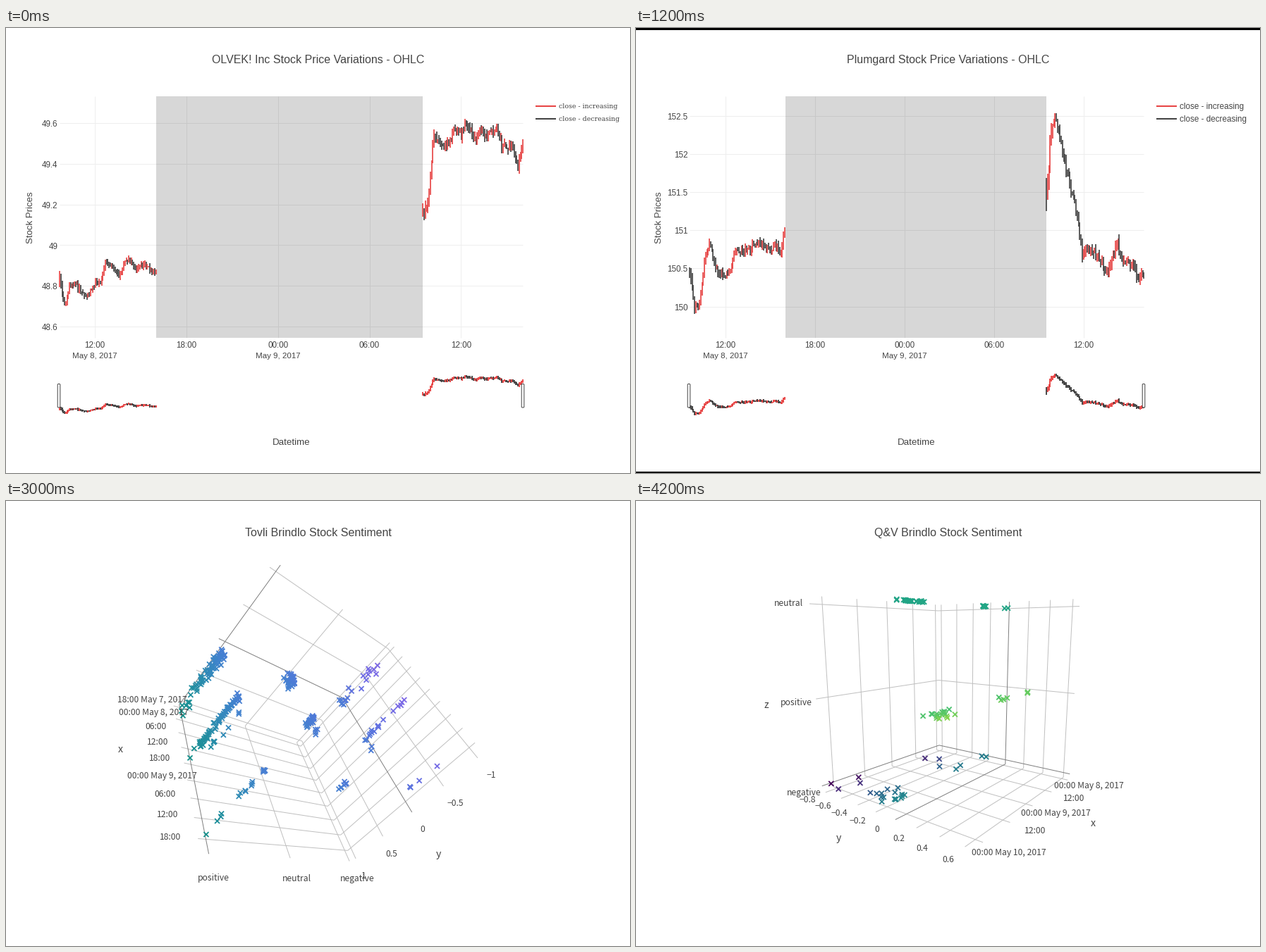
These frames come from a looping animation (885x632 px, 4800 ms). A matplotlib script:

```python
import numpy as np
import matplotlib.pyplot as plt
from matplotlib.animation import FuncAnimation
from matplotlib.collections import LineCollection
from matplotlib.colors import LinearSegmentedColormap
from matplotlib.patches import FancyBboxPatch, Rectangle

W, H, DPI = 885, 632, 100
PT = 72 / DPI  # points per pixel
SANS, SERIF, HUMAN = "Liberation Sans", "DejaVu Serif", "Noto Sans CJK JP"
INK, RED, DARK = "#444444", "#e63a3a", "#383838"
MINUS = "\u2212"

fig = plt.figure(figsize=(W / DPI, H / DPI), dpi=DPI, facecolor="white")


# ---------- helpers, all in pixels with y down ----------
def new_scene():
    ax = fig.add_axes([0, 0, 1, 1], label=f"scene{len(fig.axes)}")
    ax.set_xlim(0, W)
    ax.set_ylim(H, 0)
    ax.axis("off")
    return ax


def text(ax, x, y, s, size, font=SANS, ha="center"):
    ax.text(x, y + 0.36 * size, s, fontsize=size * PT, family=font,
            color=INK, ha=ha, va="baseline", zorder=6)


def lines(ax, segs, color, width=1.0, z=1):
    segs = np.reshape(segs, (-1, 2, 2))
    ax.add_collection(LineCollection(segs, colors=color, linewidths=width * PT,
                                     zorder=z), autolim=False)


def box(ax, x0, y0, x1, y1, **style):
    ax.add_patch(Rectangle((x0, y0), x1 - x0, y1 - y0, zorder=2, lw=0, **style))


# ---------- price charts ----------
TOP, BOTTOM, LEFT = 97, 440, 76
HIGH, LOW = 114, 423  # extremes reached by the bars


def bars(rng, x0, x1, knots, vol):
    """Low/high bars around evenly spaced knots, wilder just after opening."""
    x = np.arange(x0, x1 + 0.5, 1.75)
    n = len(x)
    close = np.interp(x, np.linspace(x0, x1, len(knots)), knots) + rng.normal(0, vol * 0.4, n)
    start = np.r_[knots[0], close[:-1]]
    reach = vol * (1 + 2 * np.exp(-np.arange(n) / 2))
    top = np.minimum(start, close) - rng.uniform(0.1, 1, n) * reach
    low = np.maximum(start, close) + rng.uniform(0.1, 1, n) * reach
    color = np.where(close < start, RED, DARK)
    return x, np.clip(top, HIGH, LOW), np.clip(low, HIGH, LOW), color


def mini(y):
    return 553 + (y - LOW) * 0.202


def price_chart(name, days, vols, ticks, label_x, noon=127, hour=21.17, right=720,
                legend=(738, SANS, 11.6), framed=False, seed=1):
    """ticks holds first value, step, y of the first, spacing and count."""
    ax = new_scene()
    rng = np.random.default_rng(seed)
    close_x, open_x = noon + 4 * hour, noon + 21.5 * hour
    text(ax, 442.5, 44.5, f"{name} Stock Price Variations - OHLC", 16)

    first, step, y0, gap, count = ticks
    for k in range(count):
        y = y0 - gap * k
        lines(ax, [LEFT, y, right, y], "#eeeeee")
        text(ax, 73.5, y + 1, f"{first + step * k:.5g}", 11.6, ha="right")
    for k in range(5):
        x = noon + 6 * hour * k
        lines(ax, [x, TOP, x, BOTTOM], "#eeeeee")
        text(ax, x, 449.5, f"{(12 + 6 * k) % 24:02d}:00", 11.6)
        if k in (0, 2):
            text(ax, x, 464.5, f"May {8 + k // 2}, 2017", 11.5)
    box(ax, close_x, TOP, open_x, BOTTOM, fc="black", alpha=0.155)

    spans = ((LEFT, close_x), (open_x, right))
    parts = [bars(rng, *s, d, v) for s, d, v in zip(spans, days, vols)]
    x, hi, lo, color = map(np.concatenate, zip(*parts))
    lines(ax, np.c_[x, hi, x, lo], color, 1.6, 3)
    lines(ax, np.c_[x, mini(hi) - 0.6, x, mini(lo) + 0.6], color, 1.8, 3)

    for hx in (75, right):
        ax.add_patch(FancyBboxPatch((hx - 1.8, 505.5), 3.6, 33.5,
                                    boxstyle="round,pad=0,rounding_size=1.2",
                                    fc="white", ec=INK, lw=PT, zorder=5))
    lx, font, size = legend
    for y, c, s in ((111, RED, "increasing"), (129, DARK, "decreasing")):
        lines(ax, [lx, y, lx + 28.5, y], c, 1.9)
        text(ax, lx + 33, y, f"close - {s}", size, font, "left")

    ax.text(label_x, 269, "Stock Prices", rotation=90, fontsize=13.3 * PT, family=SANS,
            color=INK, ha="center", va="center")
    text(ax, (LEFT + right) / 2, 587, "Datetime", 13.4)
    if framed:
        box(ax, 0, 0, W, 2.5, fc="black")
        box(ax, 0, 630, W, H, fc="black")
    return ax


# ---------- sentiment plots ----------
# Box corners seen from the back corner outwards, then the middles of its three edges.
# Axes: 0 time, 1 score, 2 mood.
KEYS = np.array([(0, 0, 0), (1, 0, 0), (0, 1, 0), (0, 0, 1), (1, 1, 0), (1, 0, 1), (0, 1, 1),
                 (.5, 0, 0), (0, .5, 0), (0, 0, .5)], float)
AXES = np.eye(3)


def camera(pixels):
    """Fit a perspective view that sends KEYS to the given pixels."""
    px = np.reshape(pixels, (-1, 2)).astype(float)
    k = KEYS[:len(px)]
    one = np.c_[k, np.ones(len(k))]
    zero = np.zeros_like(one)
    m = np.r_[np.c_[one, zero, -k * px[:, :1]], np.c_[zero, one, -k * px[:, 1:]]]
    fit = np.linalg.lstsq(m, px.T.ravel(), rcond=None)[0]
    flat, depth = fit[:8].reshape(2, 4), fit[8:]

    def project(p):
        p = np.asarray(p)
        return (p @ flat[:, :3].T + flat[:, 3]) / (p @ depth + 1)[..., None]
    return project


def time_names(start, step, n):
    """Clock labels from an hour counted since May 7; dated at midnight and first."""
    names = []
    for k in range(n):
        day, hour = divmod(start + step * k, 24)
        date = f" May {7 + day}, 2017" if k == 0 or hour == 0 else ""
        names.append(f"{hour:02d}:00{date}")
    return names


def score_names(first, last, n):
    return [f"{round(v, 1) + 0.0:g}".replace("-", MINUS) for v in np.linspace(first, last, n)]


def tweets(rng, moments, groups):
    """Points for each moment (time, spread, share) and group (mood, near, far, count)."""
    out = []
    for time, spread, share in moments:
        for mood, near, far, count in groups:
            n = max(1, round(count * share))
            score = near + (far - near) * rng.uniform(0, 1, n) ** 1.5
            out.append(np.c_[rng.normal(time, spread, n), score, np.full(n, mood)])
    return np.concatenate(out)


def slots(ax, rng, spots, colors):
    """Thin box markers, now and then with an edge missing."""
    for (x, y), c in zip(spots, colors):
        l, r, t, b = x - 2.5, x + 2.5, y - 4.7, y + 4.7
        edges = np.array([(l, t, r, t), (l, b, r, b), (l, t, l, b), (r, t, r, b)])
        lines(ax, edges[rng.random(4) < 0.93], [c], 1, 4)


def sentiment(name, pixels, times, scores, moods, zero_mood, moments, groups, cmap,
              titles, side, gap, boxy=False, mixed=False, seed=1):
    ax = new_scene()
    rng = np.random.default_rng(seed)
    project = camera(pixels)
    size, head = (15.8, (56, 21, HUMAN)) if boxy else (12.1, (44.5, 16, SANS))
    text(ax, 442.5, head[0], f"{name} Brindlo Stock Sentiment", *head[1:])

    names = (times, scores, moods)
    reach = 1 + np.array([gap - 0.12, 0.04, 0.04])
    outward = (AXES[side] * 1.17, AXES[0] * (1 + gap), AXES[0] * (1 + gap))
    for i, ticks in enumerate(names):
        for t, s in zip(np.linspace(0.03, 1, len(ticks)), ticks):
            base = AXES[i] * t
            dark = i > 0 and s in ("0", zero_mood)
            color = "#808080" if dark else "#dddddd" if boxy else "#c0c0c0"
            for j in {0, 1, 2} - {i}:
                lines(ax, project([base, base + AXES[j] * reach[j]]), color, z=1 + 0.1 * dark)
            text(ax, *project(base + outward[i]), s, size, HUMAN)

    far = (AXES[side] * 1.36, AXES[0] * (1 + 1.85 * gap), AXES[0] * (1 + 1.85 * gap))
    for i, s in enumerate("xyz"):
        if s in titles:
            x, y = project(AXES[i] * 0.52 + far[i])
            text(ax, x, y - 1.5, s, size + 2, HUMAN)

    points = tweets(rng, moments, groups)
    spots = project(points) + rng.normal(0, 0.6, (len(points), 2))
    colors = cmap(rng.random(len(points)) if mixed else np.clip(points[:, 1], 0, 1))
    if boxy:
        slots(ax, rng, spots, colors)
    else:
        ax.scatter(*spots.T, c=colors, marker="x", s=(7 * PT) ** 2,
                   linewidths=1.8 * PT, zorder=4)
    return ax


def ramp(*stops):
    return LinearSegmentedColormap.from_list("ramp", stops)


# ---------- the eight scenes ----------
scenes = [
    price_chart("OLVEK! Inc",
                ([355, 396, 365, 362, 371, 383, 376, 364, 362, 333,
                  336, 346, 351, 330, 330, 342, 337, 337, 344, 350],
                 [265, 250, 150, 162, 165, 160, 141, 150, 140, 143,
                  160, 140, 156, 144, 139, 167, 168, 167, 200, 166]),
                (5, 8), (48.6, 0.2, 424, 57.8, 6), 35.5, 126, 21.64, 733,
                (751, SERIF, 9.36), seed=4),
    sentiment("Olvek! Inc",
              [423, 235, 358, 377, 583, 292, 354, 143, 514, 453, 252, 354, 600, 221,
               391, 305, 501, 262],
              time_names(24, 6, 8), score_names(0, 1, 6), ["positive", "neutral"], "positive",
              [(0.27, 0.1, 1)],
              [(1, 0.02, 0.02, 20), (0.03, 0.98, 0.98, 46), (0.03, 0.1, 0.5, 8)],
              ramp((0, "#8d84f2"), (0.5, "#6a70ea"), (0.8, "#5a6ce0"), (1, "#3fae92")),
              "xyz", 1, 0.23, boxy=True, mixed=True, seed=3),
    price_chart("Plumgard",
                ([345, 400, 390, 328, 306, 341, 350, 355, 349, 315,
                  318, 316, 312, 308, 303, 313, 316, 308, 322, 282],
                 [238, 140, 132, 166, 212, 232, 265, 322, 312, 319,
                  320, 341, 350, 318, 308, 331, 330, 337, 358, 347]),
                (7, 9), (150, 0.5, 395.5, 54.2, 6), 33, framed=True, seed=7),
    sentiment("Plumgard",
              [443, 320, 443, 481, 580, 242, 305, 248, 617, 433, 271, 437, 442, 127,
               443, 388, 503, 287, 380, 288],
              time_names(24, 6, 9), score_names(1, -1, 5),
              ["negative", "positive", "neutral"], "neutral",
              [(0.11, 0.05, 1), (0.36, 0.02, 0.12), (0.48, 0.02, 0.08), (0.85, 0.01, 0.07)],
              [(1, 0.51, 0.48, 26), (0.515, 0.45, 0, 56), (0.03, 0.53, 0.95, 20)],
              ramp((0, "#1f9a6c"), (0.25, "#2f9a80"), (0.42, "#4f94d8"), (0.5, "#6f6cea"),
                   (0.65, "#b43cd8"), (1, "#e078c8")),
              "x", 2, 0.145, boxy=True, seed=5),
    price_chart("Tovli",
                ([420, 355, 320, 285, 255, 238, 218, 200, 183, 190, 212],
                 [168, 165, 152, 148, 141, 133, 122, 138, 160, 184, 161]),
                (6, 6), (149, 1, 424.6, 52.8, 7), 37, framed=True, seed=9),
    sentiment("Tovli",
              [416, 344, 484, 498, 541, 208, 245, 286, 657, 350, 285, 481, 382, 101,
               446, 409, 478, 284, 342, 324],
              time_names(18, 6, 9), score_names(1, -1, 5),
              ["negative", "neutral", "positive"], "positive",
              [(0.06, 0.03, 1), (0.46, 0.012, 0.9), (0.56, 0.01, 0.1), (0.97, 0.006, 0.22)],
              [(1, 0.48, 0, 76), (0.515, 0.52, 0.45, 35), (0.03, 0.5, 0.9, 18)],
              ramp((0, "#14908a"), (0.25, "#2a8cae"), (0.42, "#3f84cc"), (0.52, "#4f7ad8"),
                   (0.65, "#6570e2"), (1, "#8a64e8")),
              "xy", 2, 0.2, seed=8),
    price_chart("Q&V",
                ([221, 300, 355, 375, 325, 300, 275, 258, 245, 240, 235],
                 [175, 122, 140, 155, 172, 190, 300, 400, 405, 335, 300]),
                (6, 6), (2394, 2, 380, 53.8, 6), 35, seed=11),
    sentiment("Q&V",
              [430, 354, 281, 405, 605, 391, 428, 157, 481, 482, 264, 147, 620, 150,
               365, 376, 510, 371, 429, 255],
              time_names(24, 12, 5), score_names(-0.8, 0.6, 8),
              ["negative", "positive", "neutral"], "negative",
              [(0.93, 0.05, 1), (0.33, 0.04, 0.25), (0.05, 0.02, 0.1)],
              [(1, 0.58, 0.6, 22), (0.5, 0.71, 0.82, 18), (0.03, 0.47, 0, 20)],
              plt.get_cmap("viridis"), "xyz", 1, 0.2, seed=2),
]


def show(i):
    for k, ax in enumerate(scenes):
        ax.set_visible(k == i)
    return scenes


anim = FuncAnimation(fig, show, frames=len(scenes), init_func=lambda: show(0),
                     interval=600, repeat=True, repeat_delay=0, blit=False)
plt.show()
```
